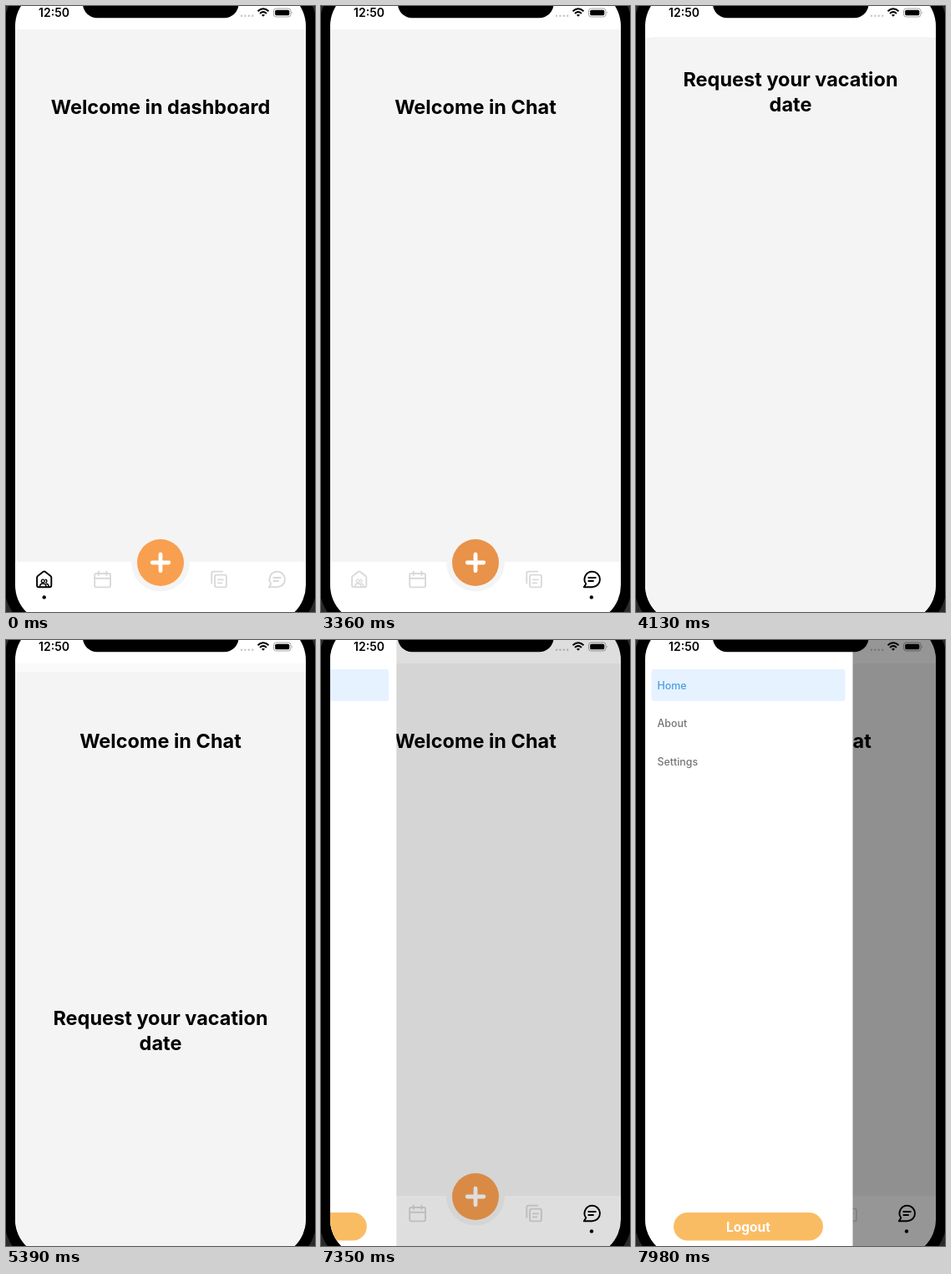
These frames come from a looping animation (370x724 px, 8 s). An HTML page:

```html
<!DOCTYPE html>
<html lang="en">
<head>
<meta charset="utf-8">
<title>Tab bar with modal and drawer</title>
<style>
  html, body { margin: 0; width: 100%; height: 100%; overflow: hidden; background: #2b2b2b; }
  svg { display: block; width: 100vw; height: 100vh; font-family: Inter, "Liberation Sans", sans-serif; }
  .title { font-size: 23.5px; font-weight: 700; text-anchor: middle; }
  .item { font-size: 12.4px; font-weight: 500; fill: #757575; }
  .icon { fill: none; stroke-width: 1.9; stroke-linecap: round; stroke-linejoin: round; }
  .thin { stroke-width: 1.4; }
</style>
</head>
<body>
<svg viewBox="0 0 370 724">
  <defs>
    <clipPath id="screen"><rect x="11" y="-21" width="348" height="758" rx="45"/></clipPath>
  </defs>
  <rect x="-2" y="-34" width="374" height="784" rx="58"/>
  <g clip-path="url(#screen)">
    <rect width="370" height="724" fill="#fff"/>
    <rect y="28" width="370" height="636" fill="#f4f4f4"/>
    <text id="title" class="title" x="185" y="129"></text>

    <g class="icon" transform="translate(45.7 685)">
      <path d="M-8.6-2.2Q-8.6-3.3-7.7-4L-1-9.2Q0-9.9 1-9.2L7.7-4Q8.6-3.3 8.6-2.2V7.2Q8.6 9.2 6.6 9.2H-6.6Q-8.6 9.2-8.6 7.2Z"/>
      <g class="thin">
        <circle cx="-1.4" cy="2" r="1.9"/>
        <path d="M-5.2 8.8Q-5 5-1.4 5T2.4 8.8M1.8.3A1.9 1.9 0 0 1 2 3.9M3 5.2Q5.4 5.8 5.6 8.8"/>
      </g>
    </g>
    <g class="icon" transform="translate(115.6 685)">
      <rect x="-9.4" y="-7" width="18.8" height="16.4" rx="1.8"/>
      <path d="M-9.4-1.3H9.4M-4.8-9.6V-5M4.8-9.6V-5"/>
    </g>
    <g class="icon" transform="translate(254.7 685)">
      <path d="M-8.4 4.6V-7.4Q-8.4-9.4-6.4-9.4H4.6"/>
      <rect x="-4.6" y="-5.4" width="13.8" height="14.8" rx="1.8"/>
      <path d="M-.8 .4H5.2M-.8 4.4H3.6"/>
    </g>
    <g class="icon" transform="translate(324 685)">
      <path d="M.8-9.2A9.2 9.2 0 0 1 .8 9.2H-9.2L-6.7 5.4A9.2 9.2 0 0 1 .8-9.2Z"/>
      <path d="M-3.6-2H4.8M-3.6 2H2"/>
    </g>
    <circle id="dot" cy="706.4" r="2.2"/>

    <circle cx="185" cy="664.5" r="35" fill="#f4f4f4"/>
    <circle id="add" cx="185" cy="665" r="28"/>
    <path d="M175.2 665H194.8M185 655.2V674.8" stroke="#fff" stroke-width="4.8" stroke-linecap="round"/>

    <rect id="strip" y="28" width="370" height="10" fill="#fff"/>
    <g id="sheet">
      <rect x="11" y="37" width="348" height="720" rx="9" fill="#f4f4f4"/>
      <text class="title" x="185" y="96">Request your vacation</text>
      <text class="title" x="185" y="126">date</text>
    </g>

    <rect id="shade" width="370" height="724"/>
    <g id="drawer">
      <rect x="-20" width="279.5" height="724" fill="#fff"/>
      <rect x="18.5" y="35" width="232" height="38" rx="3.5" fill="#e6f2ff"/>
      <text class="item" x="25.5" y="59" style="fill:#4a9fe3">Home</text>
      <text class="item" x="25.5" y="104.3">About</text>
      <text class="item" x="25.5" y="149.8">Settings</text>
      <rect x="45" y="684" width="179" height="33.5" rx="16.7" fill="#fabc63"/>
      <text x="134.5" y="706.6" font-size="15.5" font-weight="700" text-anchor="middle" fill="#fff">Logout</text>
    </g>

    <text x="57.5" y="13" font-size="14" font-weight="600" text-anchor="middle">12:50</text>
    <path d="M282 11.7H296" stroke="#000" stroke-opacity=".22" stroke-width="2.5" stroke-linecap="round" stroke-dasharray="0 4.4"/>
    <g fill="none" stroke="#000" stroke-width="2">
      <path d="M301.5 6.2Q308 .4 314.5 6.2M304 8.9Q308 5.4 312 8.9"/>
      <path d="M308 12.8L305.9 10.7Q308 9.1 310.1 10.7Z" fill="#000" stroke="none"/>
    </g>
    <rect x="320.5" y="3" width="20.5" height="10" rx="3" fill="none" stroke="#000" stroke-opacity=".35"/>
    <rect x="322.2" y="4.7" width="17.1" height="6.6" rx="1.6"/>
    <path d="M342.3 6.4Q344 8 342.3 9.6Z" fill-opacity=".4"/>
  </g>
  <rect x="92" y="-20" width="186.5" height="34.3" rx="17"/>
</svg>
<script>
const LOOP = 8000;
const TRAVEL = 690;       // height the sheet slides
const DRAWER = 248.5;
const $ = id => document.getElementById(id);
const icons = [...document.querySelectorAll('svg > g > .icon')];

const tabs = [
  { name: 'dashboard', x: 45.7 },
  { name: 'Calendar', x: 115.4 },
  { name: 'Docs', x: 254.7 },
  { name: 'Chat', x: 324 }
];
// Each tap dims its icon, then selects the tab on release.
const taps = [
  { tab: 1, down: 1090, up: 1280 },
  { tab: 2, down: 1715, up: 1930 },
  { tab: 3, down: 2490, up: 2710 }
];

const progress = (t, start, length) => Math.min(1, Math.max(0, (t - start) / length));
const easeOut = (p, power) => 1 - (1 - p) ** power;

function spring(ms) {
  const s = Math.max(0, ms) / 1000;
  return 1 - Math.exp(-9.8 * s) * (Math.cos(11 * s) + 0.89 * Math.sin(11 * s));
}

function drawTabs(t) {
  let active = 0, x = tabs[0].x;
  const opacity = [1, 1, 1, 1];
  for (const { tab, down, up } of taps) {
    opacity[tab] = 1 - 0.8 * (progress(t, down, 150) - progress(t, up, 250));
    if (t < up) continue;
    x += (tabs[tab].x - tabs[active].x) * spring(t - up);
    active = tab;
  }
  icons.forEach((icon, i) => {
    icon.setAttribute('stroke', i === active ? '#000' : '#d9d9d9');
    icon.setAttribute('opacity', opacity[i]);
  });
  $('dot').setAttribute('cx', x);
  $('title').textContent = 'Welcome in ' + tabs[active].name;
}

function draw(t) {
  drawTabs(t);
  $('add').setAttribute('fill', t >= 3340 && t < 3500 ? '#e99249' : '#f99f50');

  const open = easeOut(progress(t, 3440, 680), 4) - easeOut(progress(t, 5290, 590), 4);
  $('sheet').setAttribute('transform', `translate(0 ${TRAVEL * (1 - open)})`);
  $('strip').setAttribute('opacity', open);

  const slide = easeOut(progress(t, 7160, 820), 1.45);
  $('drawer').setAttribute('transform', `translate(${DRAWER * (slide - 1)})`);
  $('drawer').setAttribute('visibility', slide ? 'visible' : 'hidden');
  $('shade').setAttribute('opacity', 0.41 * slide);
}

function frame() {
  draw(performance.now() % LOOP);
  requestAnimationFrame(frame);
}
frame();
</script>
</body>
</html>
```
